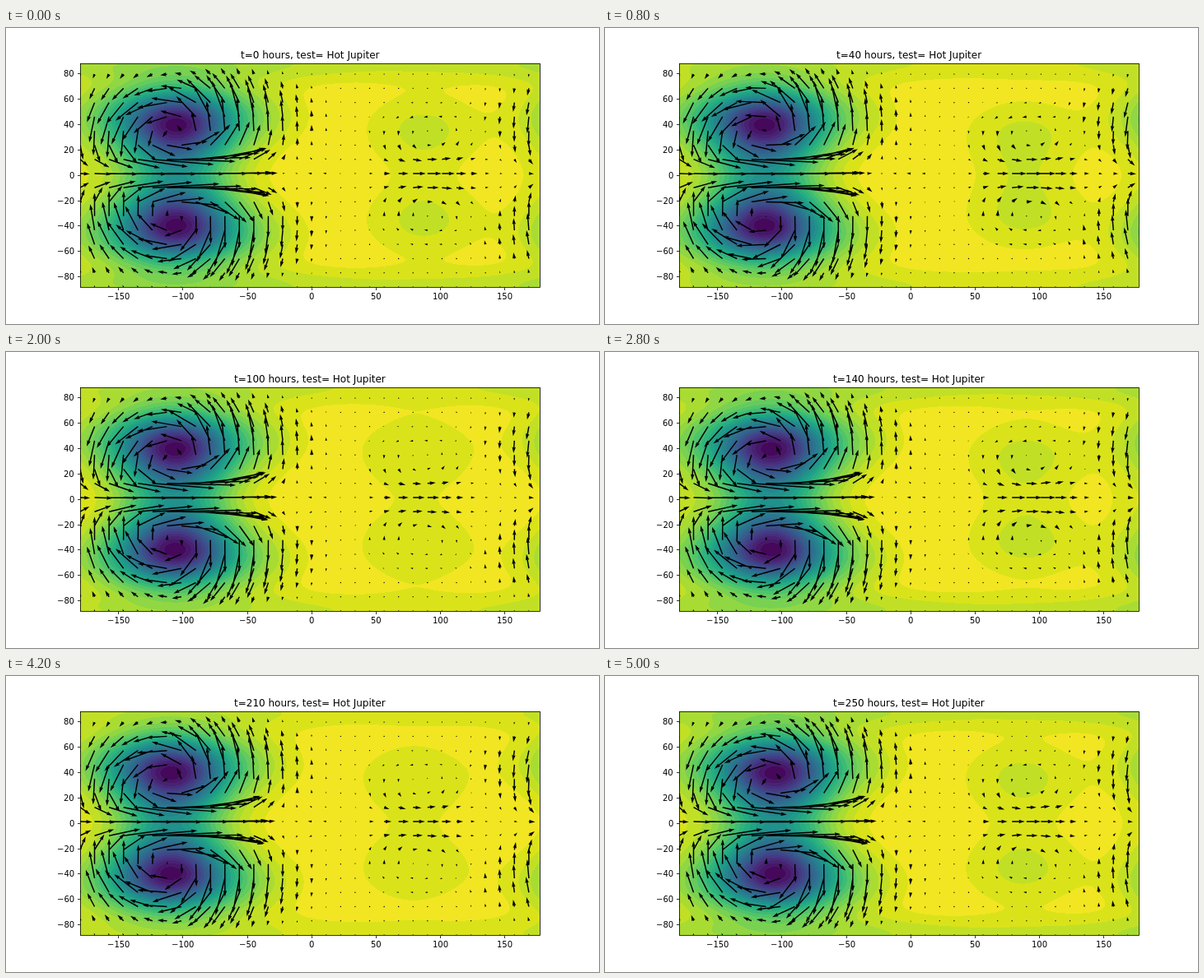
An HTML page with a canvas for the animation above (5.2 s loop, 720 by 360 pixels).

```html
<!DOCTYPE html>
<html lang="en">
<head>
<meta charset="utf-8">
<title>Shallow water flow</title>
<style>
  html, body { margin: 0; width: 100%; height: 100%; overflow: hidden; background: #fff; }
  #stage { position: relative; width: 720px; height: 360px; }
  canvas { position: absolute; left: 90px; top: 43px; }
  svg { position: absolute; left: 0; top: 0; }
  text { font: 10px "DejaVu Sans", sans-serif; }
  #title { font-size: 12px; }
</style>
</head>
<body>
<div id="stage">
  <canvas id="field" width="558" height="272"></canvas>
  <svg width="720" height="360" viewBox="0 0 720 360">
    <clipPath id="box"><rect x="90" y="43" width="558" height="272"/></clipPath>
    <path id="arrows" clip-path="url(#box)"/>
    <g id="axes" stroke="#000" stroke-width=".8" fill="none">
      <rect x="90.5" y="43.5" width="558" height="272"/>
    </g>
    <g id="labels"></g>
    <text id="title" y="37"></text>
  </svg>
</div>
<script>
const STEP = 200, STEPS = 26, HOURS = 10, PERIOD = 125;
const W = 558, H = 272, BANDS = 27;
const SVG = 'http://www.w3.org/2000/svg';
const $ = id => document.getElementById(id);
const { exp, cos, sin, abs, PI } = Math;

const lonX = lon => 371.2 + 1.5625 * lon;
const latY = lat => 179.1 - 1.547 * lat;
const xLon = x => (x - 371.2) / 1.5625;
const yLat = y => (179.1 - y) / 1.547;
const wrap = d => ((d + 540) % 360 + 360) % 360 - 180;
const cosDeg = d => cos(d * PI / 180);
const bell = z => exp(-z * z / 2);

const stops = ('440154 481769 482878 443a83 3e4a89 375a8c 31688e 2b758e 26828e 21918c ' +
  '1f9e89 26ad81 35b779 50c46a 6ece58 90d743 b5de2b dae319 fde725').split(' ')
  .map(h => [0, 2, 4].map(i => parseInt(h.substr(i, 2), 16)));

function viridis(v) {
  const s = v * (stops.length - 1), i = Math.min(s | 0, stops.length - 2);
  return stops[i].map((a, k) => a + (stops[i + 1][k] - a) * (s - i));
}
const palette = Array.from({ length: BANDS }, (_, i) => viridis((i + .5) / BANDS));

// Slowly oscillating parameters of the flow
function stateAt(hours) {
  const p = hours / PERIOD;
  const wave = (shift, n = 1) => cos(2 * PI * n * (p - shift));
  return {
    west: -109.7 + 4.9 * wave(.92),
    east: 84.5 + 5 * wave(.17),
    eastLat: 33.5 + 3.5 * wave(.85),
    eastDepth: 2.06 + .24 * wave(.14) + .05 * wave(.85, 2),
    polar: 1.75 + .5 * wave(.05),
    edge: 1.1 * ((1 + wave(.13)) / 2) ** 2,
    drift: 1 + .15 * wave(.25)
  };
}

const lobe = y => bell((y - 35) / (y > 35 ? 20 : 24));
function bump(dx, y, mid) {
  const dy = (y - mid) / (y > mid ? 22 : 25);
  return exp(-.459 * Math.pow(dx * dx + dy * dy, 1.25));
}

const ctx = $('field').getContext('2d');
const img = ctx.createImageData(W, H);

function drawField(s) {
  const cols = Array.from({ length: W }, (_, i) => {
    const lon = xLon(90.5 + i), c = cosDeg(lon - s.west);
    return {
      low: 19.2 * exp(3.8 * (c - 1)),
      belt: 9 * Math.pow((1 + c) / 2, 2.5),
      polar: s.polar * (1.3 + .3 * c),
      edge: s.edge * bell(wrap(lon - 177) / 20),
      dx: wrap(lon - s.east) / 35
    };
  });
  let k = 0;
  for (let j = 0; j < H; j++) {
    const lat = yLat(43.5 + j);
    const low = lobe(lat) + lobe(-lat);
    const belt = bell((abs(lat) - 48) / 17);
    const edge = bell(lat / 40);
    const polar = bell((88 - abs(lat)) / 11);
    for (const c of cols) {
      const depth = c.low * low + c.belt * belt + c.edge * edge + c.polar * polar +
        s.eastDepth * (bump(c.dx, lat, s.eastLat) + bump(c.dx, -lat, s.eastLat));
      const band = Math.max(0, Math.min(BANDS - 1, Math.floor(BANDS - depth)));
      const [r, g, b] = palette[band];
      img.data[k++] = r;
      img.data[k++] = g;
      img.data[k++] = b;
      img.data[k++] = 255;
    }
  }
  ctx.putImageData(img, 0, 0);
}

// Wind in pixels of arrow length
function wind(s, lon, lat) {
  const a = abs(lat), side = Math.tanh(lat / 8);
  const d = wrap(lon - s.west), e = wrap(lon - s.east - 3);
  const swirl = z => z * exp(.5 - z * z / 2);
  const u = 100 * bell(d / 36) * exp(-((a / 23) ** 3))
    - 37 * bell(d / 38) * bell((a - 57) / 13)
    - 6 * bell((lon + 5) / 22) * bell(lat / 12)
    + s.drift * bell(e / 27) * (17 * bell(lat / 15) - 5 * bell((a - 48) / 9));
  const v = side * ((d > 0 ? 45 * swirl(d / 42) : 35 * swirl(d / 48)) * bell((a - 42) / 20)
    + 7 * s.drift * swirl(e / 25) * bell((a - 28) / 12));
  return [u, v];
}

const SHAFT = 1.48, HEAD = 5;
function arrow(x, y, u, v) {
  const len = Math.hypot(u, v), n = len / SHAFT;
  let pts;
  if (n < 1) {
    pts = Array.from({ length: 6 }, (_, i) => [cos(i * PI / 3) / 2, sin(i * PI / 3) / 2]);
  } else {
    const size = Math.min(1, n / HEAD), tip = Math.max(n, HEAD);
    const half = [[0, .5], [tip - 4.5, .5], [tip - HEAD, 1.5]];
    pts = [...half, [tip, 0], ...half.map(([a, b]) => [a, -b]).reverse()]
      .map(q => q.map(c => c * size));
  }
  const cx = len ? u / len * SHAFT : SHAFT, cy = len ? -v / len * SHAFT : 0;
  return 'M' + pts.map(([a, b]) =>
    (x + a * cx - b * cy).toFixed(2) + ' ' + (y + a * cy + b * cx).toFixed(2)).join('L') + 'Z';
}

function drawArrows(s) {
  let path = '';
  for (let r = -8; r < 8; r++) {
    for (let c = 0; c < 32; c++) {
      const lon = -180 + 11.25 * c, lat = 1.395 + 11.157 * r;
      path += arrow(lonX(lon), latY(lat), ...wind(s, lon, lat));
    }
  }
  $('arrows').setAttribute('d', path);
}

function add(parent, tag, attrs) {
  const el = document.createElementNS(SVG, tag);
  for (const k in attrs) el.setAttribute(k, attrs[k]);
  return $(parent).appendChild(el);
}

// Sets a text so that its left edge falls on a whole pixel
function write(el, text, x, align) {
  el.textContent = text;
  el.setAttribute('x', Math.round(x - align * el.getComputedTextLength()));
}
const signed = n => String(n).replace('-', '\u2212');

for (let lon = -150; lon <= 150; lon += 50) {
  const x = Math.floor(lonX(lon)) + .5;
  add('axes', 'path', { d: `M${x} 315.5v3.5` });
  write(add('labels', 'text', { y: 330 }), signed(lon), lonX(lon), .5);
}
for (let lat = -80; lat <= 80; lat += 20) {
  const y = Math.floor(latY(lat)) + .5;
  add('axes', 'path', { d: `M90.5 ${y}h-3.5` });
  write(add('labels', 'text', { y: y + 3.5 }), signed(lat), 83, 1);
}

let shown = -1;
function render(now) {
  const step = Math.floor(now / STEP) % STEPS;
  if (step !== shown) {
    shown = step;
    const hours = step * HOURS, s = stateAt(hours);
    drawField(s);
    drawArrows(s);
    write($('title'), `t=${hours} hours, test= Hot Jupiter`, 369, .5);
  }
}

const start = performance.now();
function tick() {
  render(performance.now() - start);
  requestAnimationFrame(tick);
}
tick();
</script>
</body>
</html>
```
